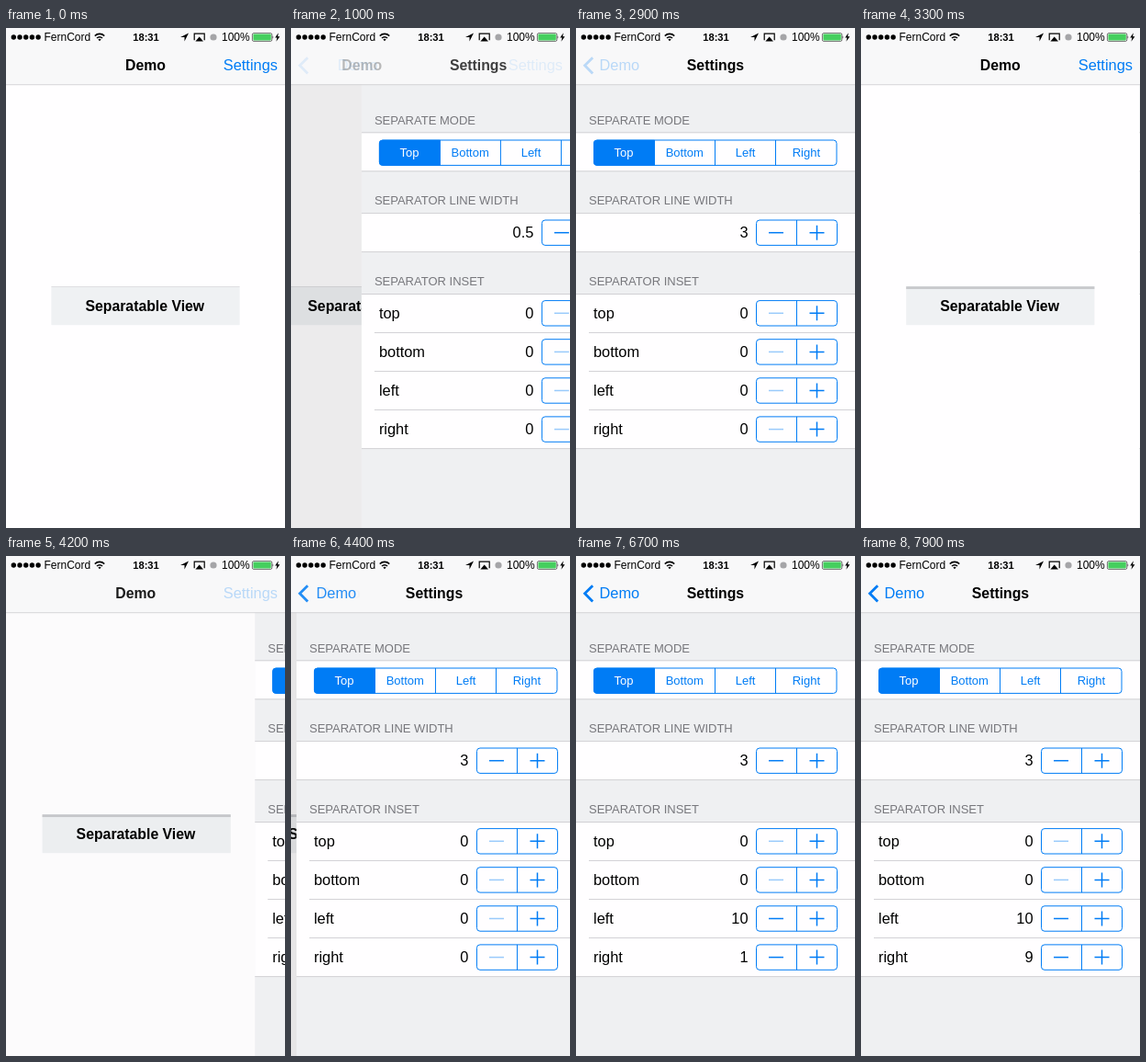
These frames come from a looping animation (304x544 px, 8000 ms). An HTML page:

```html
<!DOCTYPE html>
<html lang="en">
<head>
<meta charset="utf-8">
<title>Separator settings demo</title>
<style>
  html, body { margin: 0; width: 100%; height: 100%; overflow: hidden; background: #fffeff; }
  svg { display: block; width: 100vw; height: 100vh; font: 16.4px "Liberation Sans", Arial, sans-serif; }
  .title { font-size: 15.8px; font-weight: bold; text-anchor: middle; }
  .heading { font-size: 13px; fill: #77777c; }
  .segment { font-size: 13px; text-anchor: middle; }
  .status { font-size: 12px; }
  .value { text-anchor: end; }
  .blue { fill: #007cf5; }
  .outline { fill: none; stroke: #007cf5; }
  .rule { fill: none; stroke: #c8c7cc; stroke-width: .8; }
  .cell { fill: #fffeff; }
</style>
</head>
<body>
<svg id="stage" viewBox="0 0 304 544"></svg>
<script>
const LOOP = 8000, WIDTH = 304;
const stage = document.getElementById('stage');
const clamp = (v, lo, hi) => Math.max(lo, Math.min(hi, v));

const text = (x, y, label, cls = '', id = '') =>
  `<text x="${x}" y="${y}" class="${cls}" id="${id}">${label}</text>`;

const cells = (top, bottom) =>
  `<rect class="cell" y="${top}" width="304" height="${bottom - top}"/>
   <path class="rule" d="M0 ${top}H304M0 ${bottom}H304"/>`;

const stepper = (y, name) => `
  ${text(187.5, y + 5.6, '', 'value', name + 'Value')}
  <rect class="outline" x="196.5" y="${y - 13.7}" width="88" height="27.4" rx="3.5"/>
  <path class="outline" d="M240.5 ${y - 13.7}v27.4"/>
  <g class="outline" stroke-width="1.5">
    <path id="${name}Minus" d="M210 ${y}h16"/>
    <path d="M254.5 ${y}h16m-8 -8v16"/>
  </g>`;

const insetRow = (name, i) => {
  const y = 310.3 + i * 42.1;
  return text(19, y + 5.4, name) + stepper(y, name) +
    (i < 3 ? `<path class="rule" d="M14 ${331.5 + i * 42}H304"/>` : '');
};

const demoView = `
  <g id="demo">
    <rect class="cell" width="304" height="544"/>
    <rect x="49.4" y="281.2" width="205.2" height="42" fill="#eff1f3"/>
    <rect id="separator" x="49.4" y="281.2" width="205.2" fill="#c8c9cc"/>
    ${text(151.3, 307.6, 'Separatable View', 'title')}
  </g>
  <rect id="dim" width="304" height="544"/>`;

const settingsView = `
  <g id="settings">
    <rect width="304" height="544" fill="#eff0f2"/>
    ${text(14, 104.5, 'SEPARATE MODE', 'heading')}
    ${text(14, 192, 'SEPARATOR LINE WIDTH', 'heading')}
    ${text(14, 279.5, 'SEPARATOR INSET', 'heading')}
    ${cells(113.8, 155.8)}${cells(201.6, 243.6)}${cells(289.5, 457.6)}
    <path class="blue" d="M85.5 121.7H23a4 4 0 0 0-4 4v20a4 4 0 0 0 4 4h62.5z"/>
    <rect class="outline" x="19.5" y="122" width="264.5" height="27.4" rx="3.5"/>
    <path class="outline" d="M85.5 122v27.4M151.5 122v27.4M217.5 122v27.4"/>
    ${['Top', 'Bottom', 'Left', 'Right'].map((label, i) =>
      `<g fill="${i ? '#007cf5' : '#fff'}">${text(52 + i * 66.3, 140, label, 'segment')}</g>`).join('')}
    ${stepper(222.7, 'width')}
    ${['top', 'bottom', 'left', 'right'].map(insetRow).join('')}
  </g>`;

const navBar = `
  <rect width="304" height="61.5" fill="#f8f8f9"/>
  <path class="rule" stroke-opacity=".9" d="M0 61.7H304"/>
  ${text(152, 46.2, 'Demo', 'title', 'demoTitle')}
  ${text(152, 46.2, 'Settings', 'title', 'settingsTitle')}
  ${text(296, 46.2, 'Settings', 'blue value', 'settingsButton')}
  <path id="chevron" class="outline" stroke-width="2.8" d="M18.2 32.2L9.6 40.8L18.2 49.4"/>
  ${text(25.5, 46.2, 'Demo', 'blue', 'backLabel')}`;

const statusBar = `
  ${[0, 1, 2, 3, 4].map(i => `<circle cx="${8.3 + i * 6.7}" cy="10" r="2.7"/>`).join('')}
  ${text(41.5, 14, 'FernCord', 'status')}
  <g fill="none" stroke="#000" stroke-width="1.6">
    <path d="M96.8 8.6a7.2 7.2 0 0 1 10.4 0M99 11a4.2 4.2 0 0 1 6 0"/>
    <path d="M205.8 12.6h-.6v-6.5h11v6.5h-.6" stroke-width="1.2"/>
  </g>
  <path d="M100.4 12.4a2.3 2.3 0 0 1 3.2 0L102 14.2z"/>
  <g style="font-weight:bold;font-size:11.2px">${text(138.2, 14, '18:31')}</g>
  <path d="M199 5.5L190 10h4.5v4.5z"/>
  <path d="M210.7 9.5l4.3 5h-8.6z"/>
  <circle cx="226" cy="10" r="3.6" fill="#a5a5a8"/>
  ${text(235, 14, '100%', 'status')}
  <rect x="268.4" y="5.6" width="21.4" height="8.8" rx="1.6" fill="#fff" stroke="#333" stroke-width=".7"/>
  <rect x="269.4" y="6.6" width="19.4" height="6.8" rx=".8" fill="#45cf5e"/>
  <path d="M290.6 8.2q1.4 1.8 0 3.6z"/>
  <path d="M296.8 5.2l-3.6 5.3h2.2l-1 4.3 4-5.6h-2.3z"/>`;

stage.innerHTML = demoView + settingsView + navBar + statusBar;
const el = {};
stage.querySelectorAll('[id]').forEach(node => { if (node.id) el[node.id] = node; });

// Critically damped spring: remaining distance after ms.
const remaining = ms => {
  const x = Math.max(0, ms) * .0265;
  return (1 + x) * Math.exp(-x);
};

// 0 = demo screen, 1 = settings screen.
function pushProgress(t) {
  if (t < 2985) return 1 - remaining(t - 900);
  if (t < 4180) return t < 3400 ? remaining(t - 2985) : 0;
  return 1 - remaining(t - 4180);
}

const taps = (t, start, gap, max) => clamp(Math.floor((t - start) / gap), 0, max);
const between = (t, a, b) => t >= a && t < b;
const shift = (node, x) => node.setAttribute('transform', `translate(${x} 0)`);
const fade = (node, alpha) => node.setAttribute('opacity', alpha);

function render(t) {
  const p = pushProgress(t), rest = 1 - p;

  shift(el.demo, -.3 * WIDTH * p);
  fade(el.dim, .1 * p);
  shift(el.settings, WIDTH * rest);

  shift(el.demoTitle, -100 * p);
  fade(el.demoTitle, rest);
  shift(el.settingsTitle, 206 * rest);
  fade(el.settingsTitle, p);
  shift(el.backLabel, 100 * rest);
  const back = Math.min(between(t, 2800, 2985) ? .25 : 1, p ** 8);
  fade(el.backLabel, back);
  fade(el.chevron, back);
  const pressed = between(t, 700, 1000) || between(t, 3900, 4300);
  fade(el.settingsButton, Math.min(pressed ? .25 : 1, rest ** 1.7));

  const values = {
    width: .5 + .5 * taps(t, 1500, 200, 5),
    top: 0,
    bottom: 0,
    left: taps(t, 4800, 160, 10),
    right: taps(t, 6440, 160, 9)
  };
  for (const name in values) {
    el[name + 'Value'].textContent = values[name];
    fade(el[name + 'Minus'], values[name] ? 1 : .4);
  }
  el.separator.setAttribute('height', .95 * values.width);
}

const start = performance.now();
function tick() {
  render((performance.now() - start) % LOOP);
  requestAnimationFrame(tick);
}
tick();
</script>
</body>
</html>
```
